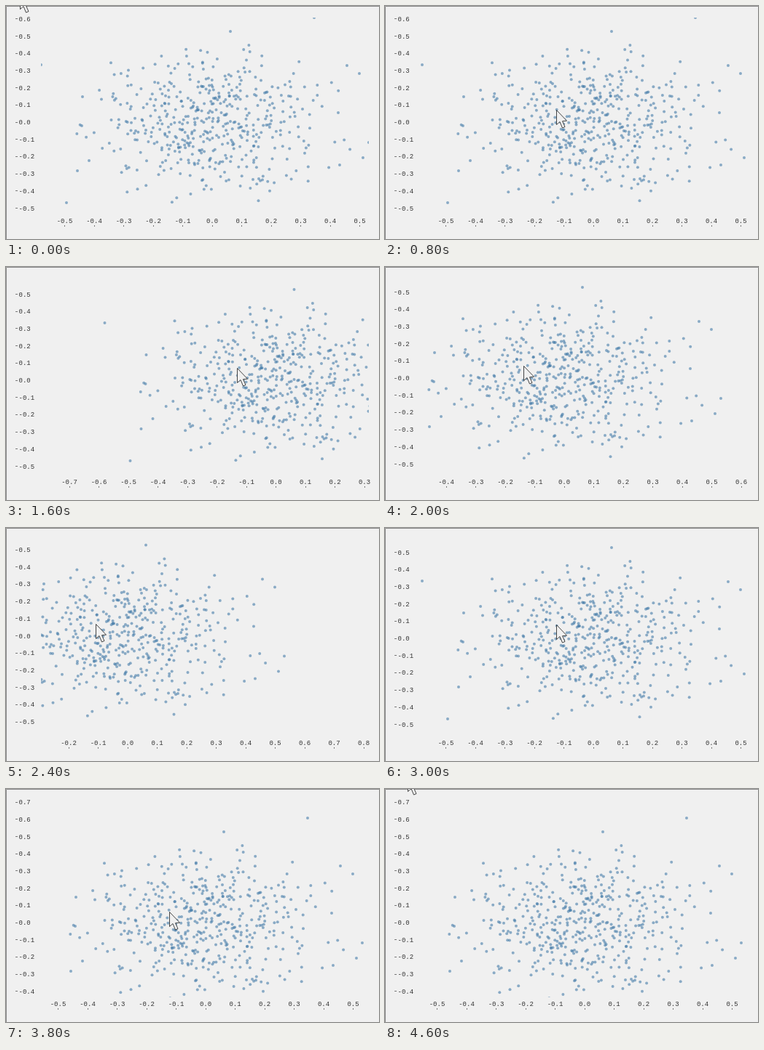
An HTML page that plays this animation: 512 px wide and 321 px high, repeating every 4.8 s.

```html
<!DOCTYPE html>
<html>
<head>
<meta charset="utf-8">
<style>
  html, body { margin: 0; width: 100%; height: 100%; overflow: hidden; background: #f0f0f0; }
  svg { display: block; width: 512px; height: 321px; }
  text { font: 9px "Liberation Mono", "DejaVu Sans Mono", monospace; fill: #333; }
  #xAxis text { text-anchor: middle; }
  .tick { stroke: #777; }
  circle { fill: #447ba8; fill-opacity: .6; }
</style>
</head>
<body>
<svg viewBox="0 0 512 321">
  <clipPath id="plot"><rect x="48" y="16" width="450" height="271"/></clipPath>
  <path d="M.5 321V.5H512" fill="none" stroke="#8c8c8c"/>
  <g clip-path="url(#plot)"><g id="dots"></g></g>
  <g id="xAxis"></g>
  <g id="yAxis"></g>
  <path id="cursor" d="M0 0V20L4.5 16L8 24.5L11.5 23L8 15.2L14 14.7Z" fill="#f0f0f0" stroke="#333" stroke-width=".9"/>
</svg>
<script>
const $ = id => document.getElementById(id);
const LOOP = 4800, STEP = 200;
const DX = 40.5, DY = 23.7;               // px per 0.1 on each axis
const GRAB = [51, 17], LAG = 12;          // pointer offset in px, plot delay in ms
const DRAG_START = 200, DRAG_END = 3800;

// Key positions: time, x, y
const originKeys = [
  [600, 283, 160], [800, 286, 160], [1000, 290, 156], [1400, 374, 156],
  [1600, 370.5, 156], [1800, 325, 156], [2200, 167, 150], [2400, 167, 148.5],
  [2600, 286, 160], [2800, 286, 160], [3000, 286, 152], [3400, 275, 71], [3800, 274, 184]
];
const leaveKeys = [
  [3800, 224, 169], [4000, 199, 142], [4200, 100, -40], [4400, 19, -18], [4600, 31, -17]
];

function track(keys, t) {
  const n = keys.findIndex(key => key[0] > t);
  if (n < 1) return (n ? keys[keys.length - 1] : keys[0]).slice(1);
  const [a, b] = [keys[n - 1], keys[n]], u = (t - a[0]) / (b[0] - a[0]);
  return [1, 2].map(i => a[i] + (b[i] - a[i]) * u);
}

function pointer(t) {
  if (t < DRAG_START) return [19, -16];
  if (t >= DRAG_END) return track(leaveKeys, t);
  return track(originKeys, t + LAG).map((v, i) => v - GRAB[i]);
}

let seed = 11;
const rand = () => (seed = seed * 16807 % 2147483647) / 2147483647;

// The farthest points, then a bell-shaped cloud with a standard deviation of 0.2
const points = [
  [-235, -79], [-200, 111], [-185, 67], [-179, 5], [-178, -35], [140, -144],
  [185, -78], [202, -67], [215, 28], [207, 49], [175, 59], [25, -125]
];
while (points.length < 490) {
  const r = Math.sqrt(-2 * Math.log(rand())), a = 2 * Math.PI * rand();
  if (r < 2.5) points.push([2 * DX * r * Math.cos(a), 2 * DY * r * Math.sin(a)]);
}
$("dots").innerHTML = points.map(([x, y]) =>
  `<circle cx="${x.toFixed(1)}" cy="${y.toFixed(1)}" r="2"/>`).join("");

function axis(place, min, max, draw) {
  let out = "";
  for (let i = -15; i <= 15; i++) {
    const p = place(i);
    if (p >= min && p <= max) out += draw(p, (i / 10).toFixed(1));
  }
  return out;
}

const move = (id, [x, y]) => $(id).setAttribute("transform", `translate(${x} ${y})`);

function draw(t) {
  const [x0, y0] = track(originKeys, t);
  move("dots", [x0, y0]);
  move("cursor", pointer(t).map(v => Math.round(v) + .5));
  $("xAxis").innerHTML = axis(i => x0 + i * DX, 48, 498, (x, label) =>
    `<text x="${x}" y="299">${label}</text><path class="tick" d="M${Math.floor(x) + .5} 302v2"/>`);
  $("yAxis").innerHTML = axis(i => y0 - i * DY, 16, 287, (y, label) =>
    `<text x="17.5" y="${y + 3}">${label}</text><path class="tick" d="M13 ${Math.floor(y) + .5}h3"/>`);
}

const start = performance.now();
let shown = -1;
function frame() {
  const t = Math.floor((performance.now() - start) % LOOP / STEP) * STEP;
  if (t !== shown) draw(shown = t);
  requestAnimationFrame(frame);
}
frame();
</script>
</body>
</html>
```
